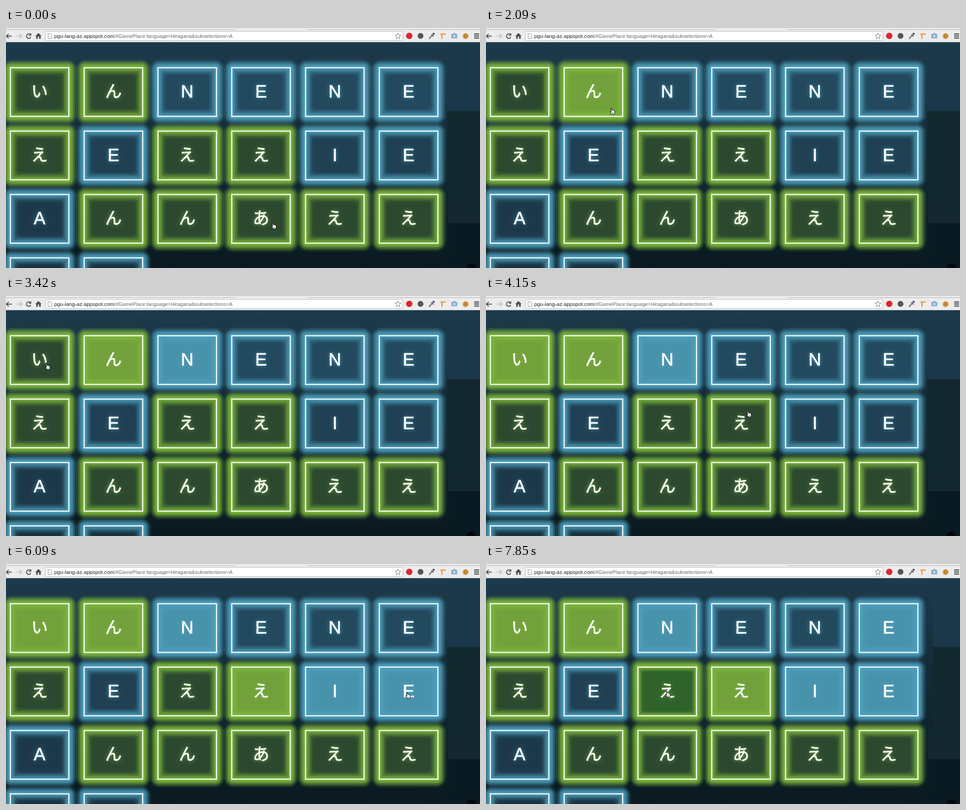
Recreate the animation shown at these times as an HTML page with a canvas. Size 1052x532 px, loop 7990 ms.

```html
<!DOCTYPE html>
<html lang="en">
<head>
<meta charset="utf-8">
<title>Kana matching game</title>
<style>
html, body { margin: 0; width: 100%; height: 100%; overflow: hidden; background: #0a1920; }
canvas { display: block; }
</style>
</head>
<body>
<canvas id="stage" width="1052" height="532"></canvas>
<script>
const W = 1052, H = 532, LOOP = 7990, TICK = 148, LAST = 53;
const TILE_W = 132.4, TILE_H = 110.4, MOVING_FROM = 6;
const ctx = document.getElementById('stage').getContext('2d');
const SANS = '"Liberation Sans", Arial, sans-serif';
const KANA = '"Noto Sans CJK JP", "Noto Sans CJK", sans-serif';

const rows = ['いんNENE', 'えEええIE', 'Aんんあええ', 'EE'];
const green = { glow: '#7eb73c', half: '#2f632b', full: '#72a13b', base: () => '#2c4930' };
const blue = { glow: '#4ea1bf', half: '#2a5866', full: '#4893ac',
  base: r => `hsl(201 46% ${25 - 2.6 * r}%)` };

// Pointer stops in ticks and pixels; a stop with a pick selects the tile below it.
const stops = [
  { leave: 0, arrive: 0, x: 592, y: 432 },
  { leave: 5, arrive: 7, x: 400, y: 275 },
  { leave: 8, arrive: 9, x: 278, y: 178, pick: 13 },
  { leave: 17, arrive: 19, x: 408, y: 154, pick: 19 },
  { leave: 20, arrive: 23, x: 90, y: 150, pick: 25 },
  { leave: 25, arrive: 28, x: 581, y: 255 },
  { leave: 29, arrive: 31, x: 720, y: 280, pick: 31 },
  { leave: 32, arrive: 35, x: 581, y: 283, pick: 37 },
  { leave: 37, arrive: 39, x: 890, y: 285, pick: 39 },
  { leave: 41, arrive: 46, x: 883, y: 162, pick: 47 },
  { leave: 48, arrive: 52, x: 401, y: 282, pick: 53 }
];

const ease = u => { u = Math.min(1, Math.max(0, u)); return u * u * (3 - 2 * u); };
const falloff = u => 1 - ease(u);

function pointerAt(n) {
  return stops.reduce((p, s) => {
    const k = n >= s.arrive ? 1 : ease((n - s.leave) / (s.arrive - s.leave));
    return { x: p.x + (s.x - p.x) * k, y: p.y + (s.y - p.y) * k };
  }, stops[0]);
}

const origin = (r, c) => ({ x: 8.4 + 163.8 * c, y: 86.8 + 140.5 * r });

function near(r, c, p, margin = 0) {
  const { x, y } = origin(r, c);
  return p.x > x - margin && p.x < x + TILE_W + margin &&
    p.y > y - margin && p.y < y + TILE_H + margin;
}

// A tile loses its colour bands once the pointer has come close to it.
function touched(r, c, n) {
  for (let i = MOVING_FROM; i <= n; i++) if (near(r, c, pointerAt(i), 50)) return true;
  return false;
}

function paint(fill, stroke, width = 1) {
  if (fill) { ctx.fillStyle = fill; ctx.fill(); }
  if (stroke) { ctx.strokeStyle = stroke; ctx.lineWidth = width; ctx.stroke(); }
}

function box(x, y, w, h, fill) {
  ctx.fillStyle = fill;
  ctx.fillRect(x, y, w, h);
}

function round(x, y, w, h, r, fill, stroke) {
  ctx.beginPath();
  ctx.roundRect(x, y, w, h, r);
  paint(fill, stroke);
}

function disc(x, y, r, fill, stroke) {
  ctx.beginPath();
  ctx.arc(x, y, r, 0, 7);
  paint(fill, stroke);
}

function path(d, fill, stroke, width = 1) {
  const p = new Path2D(d);
  if (fill) { ctx.fillStyle = fill; ctx.fill(p); }
  if (stroke) { ctx.strokeStyle = stroke; ctx.lineWidth = width; ctx.stroke(p); }
}

function backdrop(n) {
  const g = ctx.createLinearGradient(0, 31, 0, H);
  g.addColorStop(0, '#1d3a4c');
  g.addColorStop(0.4, '#152c38');
  g.addColorStop(1, '#0a1920');
  box(0, 31, W, H - 31, g);
  const left = touched(0, 5, n) ? 992 : 979;
  box(left, 31, W, 153, '#1c394b');
  box(left, 184, W, 181, '#14292f');
  box(982, 365, W, 68, '#14292f');
  box(982, 433, W, 99, '#0a1a22');
  disc(1033, 533, 11, '#03080b');
}

function glow(x, y, n, r, c, tone, pick) {
  const step = touched(r, c, n) ? 1 : 4;
  const hover = near(r, c, pointerAt(n)) && near(r, c, pointerAt(Math.max(0, n - 1)));
  const reach = hover ? 22 : 20;

  // Outside: nested layers whose opacity adds up to the falloff curve.
  let covered = 0;
  ctx.save();
  for (let d = reach; d > 0; d -= step) {
    const a = falloff((d - step / 2) / reach) * 0.96;
    ctx.globalAlpha = 1 - (1 - a) / (1 - covered);
    round(x - d, y - d, TILE_W + 2 * d, TILE_H + 2 * d, 3 + d * 1.1, tone.glow);
    covered = a;
  }
  ctx.restore();

  // Inside: from the frame towards the middle.
  const base = n < pick ? tone.base(r) : n === pick ? tone.half : tone.full;
  const depth = n === pick ? 14 : 20;
  for (let d = 0; d <= depth; d += step) {
    const a = falloff((d + step / 2) / depth) * 92;
    round(x + d, y + d, TILE_W - 2 * d, TILE_H - 2 * d, d * 0.5,
      `color-mix(in srgb, ${tone.glow} ${a}%, ${base})`);
  }
}

function tile(n, r, c) {
  const { x, y } = origin(r, c);
  const ch = rows[r][c], latin = ch < '~', tone = latin ? blue : green;
  const pick = stops.find(s => s.pick && near(r, c, s))?.pick ?? Infinity;
  glow(x, y, n, r, c, tone, pick);

  ctx.strokeStyle = '#fbfffa';
  ctx.lineWidth = 2.5;
  ctx.strokeRect(x + 1.25, y + 1.25, TILE_W - 2.5, TILE_H - 2.5);

  const at = [ch, x + TILE_W / 2, y + 67.5];
  ctx.font = latin ? `39px ${SANS}` : `37px ${KANA}`;
  ctx.textAlign = 'center';
  ctx.fillStyle = ctx.strokeStyle = '#fff';
  ctx.lineWidth = 0.8;
  ctx.shadowColor = tone.glow;
  ctx.shadowBlur = 10;
  ctx.fillText(...at);
  ctx.shadowBlur = 0;
  ctx.strokeText(...at);
}

function label(text, x, size, color) {
  ctx.font = `${size}px ${SANS}`;
  ctx.textAlign = 'left';
  ctx.fillStyle = color;
  ctx.fillText(text, x, 22);
}

function toolbar() {
  const ink = '#505050';
  box(0, 0, W, 31, '#ececec');
  box(0, 31, W, 1, '#6f7f88');
  box(0, 3, 508, 1, '#b4b4b4');
  box(668, 3, W, 1, '#b4b4b4');

  path('M6 13L1 18L6 23M1 18H13', null, ink, 2);
  path('M30 13L35 18L30 23M35 18H23', null, '#c2c2c2', 2);
  path('M55 20A5 5 0 1 1 53.5 14', null, ink, 2);
  path('M56 11V17H50Z', ink);
  path('M65 18L72 11L79 18H77V24H73.5V19H70.5V24H67V18Z', ink);

  round(87.5, 7.5, 793, 20, 2, '#fff', '#b9b9b9');
  path('M93.5 12.5H98.5L101.5 15.5V23.5H93.5Z', '#fff', '#8a8a8a');
  label('pgu-lang-az.appspot.com', 107, 11.8, '#1c1c1c');
  label('/#GamePlace:language=Hiragana&subselections=A', 240, 11.4, '#666');

  ctx.beginPath();
  for (let i = 0; i < 10; i++) {
    const a = i * Math.PI / 5 - Math.PI / 2, r = i % 2 ? 3 : 7;
    ctx.lineTo(870 + r * Math.cos(a), 18 + r * Math.sin(a));
  }
  ctx.closePath();
  paint('#fff', '#777');

  disc(895, 17.5, 7, '#d8262c');
  disc(920, 17.5, 6.5, '#555');
  path('M939 24L946 16', null, '#6c86a5', 3);
  path('M944 14L949 19', null, '#4c5870', 2);
  disc(949, 13, 2.5, '#4c5870');
  path('M964 12H976V15H969V24H966V15H964Z', '#e2a353');
  round(988, 13, 14, 10, 2, '#8db6d9');
  box(992, 11, 6, 3, '#8db6d9');
  disc(995, 18, 3, '#dcecf7', '#6c9ac0');
  disc(1020, 18, 6.5, '#d99a45');
  for (let a = 0; a < 6; a += 1.5) {
    disc(1020 + 3 * Math.cos(a), 18 + 3 * Math.sin(a), 1.1, '#75451d');
  }
  for (let y = 12; y < 22; y += 4.5) box(1039, y, 11, 2.5, ink);
}

function hand({ x, y }) {
  ctx.save();
  ctx.translate(x, y);
  ctx.lineJoin = 'round';
  path('M-1.5 0H.5L1.5 4H4L7 5.5L8 8L7 13H1.5L-2.5 8.5L-2 7L0 8Z', '#fff', '#111', 1.1);
  path('M2.5 9V11.5M5 9V11.5', null, '#333', 0.8);
  ctx.restore();
}

function draw(n) {
  backdrop(n);
  rows.forEach((row, r) => [...row].forEach((_, c) => tile(n, r, c)));
  toolbar();
  hand(pointerAt(n));
}

const start = performance.now();
let shown = -1;
function frame() {
  const t = (performance.now() - start) % LOOP;
  const n = Math.min(LAST, Math.floor(t / TICK));
  if (n !== shown) draw(shown = n);
  requestAnimationFrame(frame);
}
frame();
</script>
</body>
</html>
```
